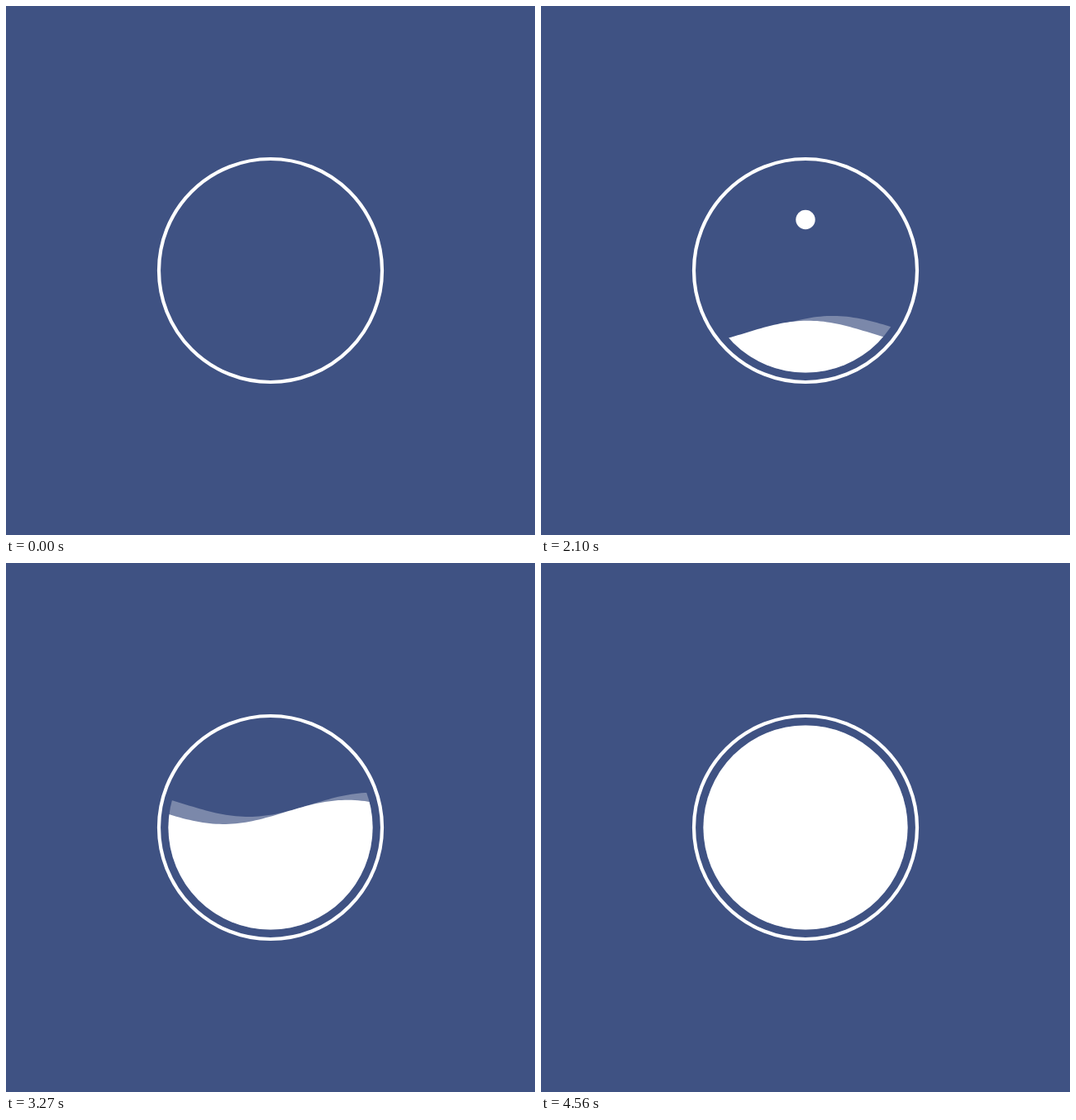
These frames come from a looping animation (640x640 px, 5.73 s). An HTML page:

```html
<!DOCTYPE html>
<html lang="en">
<head>
<meta charset="utf-8">
<title>Filling circle</title>
<style>
  html, body { margin: 0; width: 100%; height: 100%; overflow: hidden; background: #3f5283; }
  svg { display: block; width: 100vw; height: 100vh; }
</style>
</head>
<body>
<svg viewBox="0 0 640 640">
  <defs>
    <clipPath id="bowl"><circle cx="320" cy="320" r="123.6"/></clipPath>
  </defs>
  <rect width="640" height="640" fill="#3f5283"/>
  <circle cx="320" cy="320" r="135" fill="none" stroke="#fff" stroke-width="4.2"/>
  <g clip-path="url(#bowl)" fill="#fff">
    <path id="back" fill-opacity="0.31"/>
    <path id="front"/>
    <circle id="ball" cx="320" r="11.7"/>
  </g>
</svg>
<script>
const LOOP = 5730, STEP = 30;
const LEAD = 90;                    // the back wave runs ahead of the front one
const LENGTH = 300, HEIGHT = 14.6;
const PEAKS = [1867, 2882, 3744];   // moments when the ball is highest
const TOP = 222, GRAVITY = 6.71e-4;

const [back, front, ball] = ['back', 'front', 'ball'].map(id => document.getElementById(id));

function wave(t) {
  const level = 461.3 - 1.496e-5 * t * t;
  const crest = 413 + (t - 1470) / 3;
  let d = 'M190 460';
  for (let x = 190; x <= 450; x += 4) {
    const y = level - HEIGHT * Math.cos(2 * Math.PI * (x - crest) / LENGTH);
    d += `L${x} ${y.toFixed(2)}`;
  }
  return d + 'L450 460Z';
}

function ballY(t) {
  const away = Math.min(...PEAKS.map(p => Math.abs(t - p)));
  return TOP + GRAVITY * away * away;
}

function draw(t) {
  back.setAttribute('d', wave(t + LEAD));
  front.setAttribute('d', wave(t));
  ball.setAttribute('cy', ballY(t).toFixed(2));
}

let start;
function tick(now) {
  start ??= now;
  const t = (now - start) % LOOP;
  draw(Math.floor(t / STEP) * STEP);
  requestAnimationFrame(tick);
}
draw(0);
requestAnimationFrame(tick);
</script>
</body>
</html>
```
